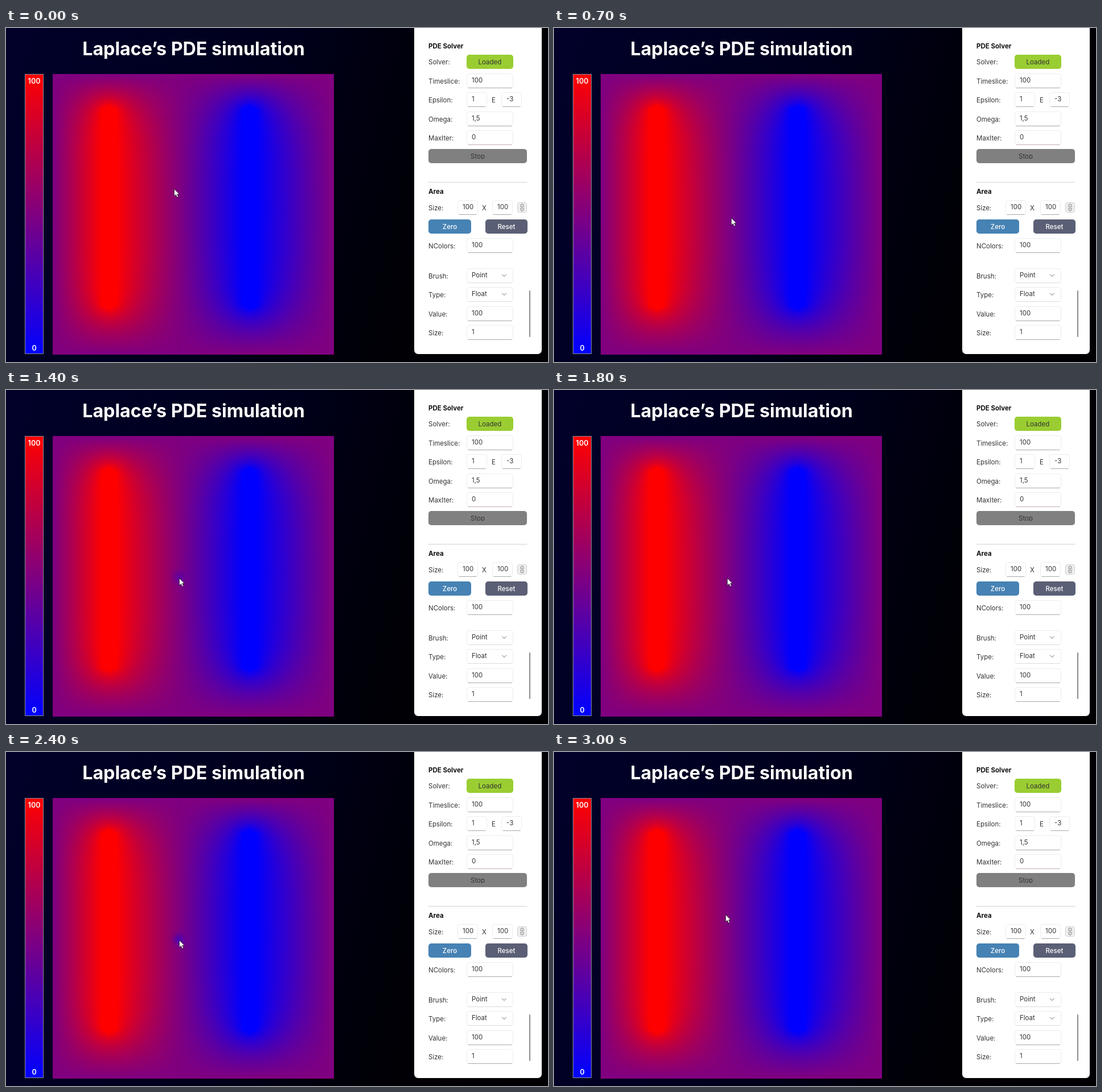
An HTML page with a canvas that plays this animation: 952x588 px, repeating every 3.1 s.

```html
<!DOCTYPE html>
<html lang="en">
<head>
<meta charset="utf-8">
<title>Laplace’s PDE simulation</title>
<style>
  html, body { margin: 0; width: 100%; height: 100%; overflow: hidden; }
  body { background: linear-gradient(105deg, #01012a, #00001c 45%, #000006 72%, #000003); }
  canvas, svg { position: absolute; left: 0; top: 0; }
  canvas { left: 82px; top: 81px; width: 494px; height: 494px; }
  text { font: 11.5px Inter, sans-serif; fill: #333; }
  .mid { text-anchor: middle; }
  .bold { font-weight: 700; fill: #111; }
  .light { fill: #fff; font-weight: 500; }
  .title { font-size: 32.2px; font-weight: 700; fill: #fff; }
  .scale { font-size: 12.5px; font-weight: 600; fill: #fff; }
</style>
</head>
<body>
<canvas id="field" width="100" height="100"></canvas>
<svg id="ui" width="952" height="588" viewBox="0 0 952 588"></svg>
<script>
const LOOP = 3100, STEP = 100, N = 100, CELL = 4.94;

// ---- interface ----
const text = (x, y, s, cls = '') => `<text x="${x}" y="${y}" class="${cls}">${s}</text>`;
const rect = (x, y, w, h, fill, r = 0, more = '') =>
  `<rect x="${x}" y="${y}" width="${w}" height="${h}" rx="${r}" fill="${fill}" ${more}/>`;
const line = (d, color, w = 1) =>
  `<path d="${d}" fill="none" stroke="${color}" stroke-width="${w}" stroke-linecap="round" stroke-linejoin="round"/>`;
const input = (x, y, w, value, under = '#a8a8a8') =>
  rect(x + .5, y + .5, w - 1, 25, '#fff', 4, 'stroke="#ececec"') +
  line(`M${x + 3} ${y + 25.5}h${w - 6}`, under) + text(x + 9, y + 16, value);
const row = (y, label, value, under) => text(742, y + 18, label) + input(809, y, 82, value, under);
const select = (y, label, value) =>
  row(y, label, value, '#dcdcdc') + line(`M871.5 ${y + 11}l3.5 3.5 3.5-3.5`, '#666');
const button = (x, y, w, label, fill, cls) =>
  rect(x, y, w, 25, fill, 5) + text(x + w / 2, y + 17, label, 'mid ' + cls);

document.getElementById('ui').innerHTML = `
  <linearGradient id="heat" x2="0" y2="1"><stop stop-color="#f00"/><stop offset="1" stop-color="#00f"/></linearGradient>` +
  text(329.5, 48, 'Laplace’s PDE simulation', 'title mid') +
  rect(33.5, 81.5, 32, 492, 'url(#heat)', 0, 'stroke="#8d8d92"') +
  text(49.5, 98, '100', 'scale mid') + text(49.5, 568, '0', 'scale mid') +
  rect(717, -12, 224, 586, '#fff', 7) +
  text(742, 36, 'PDE Solver', 'bold') + text(742, 64, 'Solver:') +
  button(809, 47, 82, 'Loaded', '#9acd32', '') +
  row(80, 'Timeslice:', '100') +
  text(742, 131, 'Epsilon:') + input(809, 113, 36, '1') + text(853, 131, 'E') + input(870, 113, 36, '-3') +
  row(147, 'Omega:', '1,5') + row(180, 'MaxIter:', '0', '#c4aab4') +
  button(742, 213, 173, 'Stop', '#808080', '') + rect(810, 230.5, 40, 5, '#808080') +
  line('M742 271.5H915', '#d2d2d2') +
  text(742, 292, 'Area', 'bold') + text(742, 321, 'Size:') +
  input(793, 303, 36, '100') + text(836, 321, 'X') + input(854, 303, 36, '100') +
  rect(898.5, 307.5, 16, 17, '#efefef', 3, 'stroke="#cfcfcf"') +
  line('M904 315v-2.5a2.5 2.5 0 0 1 5 0v2.500M904 317v2.500a2.500 2.500 0 0 0 5 0v-2.500M906.500 313.500v5', '#777') +
  button(742, 337, 75, 'Zero', '#4682b4', 'light') + button(842, 337, 74, 'Reset', '#5a5f75', 'light') +
  row(370, 'NColors:', '100') +
  select(423, 'Brush:', 'Point') + select(456, 'Type:', 'Float') +
  row(490, 'Value:', '100') + row(523, 'Size:', '1') +
  line('M920 463V543', '#8c8c8c', 2) +
  '<path id="cursor" d="M.5.5V13L3.400 10.300 5.500 15 7.700 14 5.700 9.500H9.300Z" fill="#fff" stroke="#222" stroke-width=".8"/>';

// ---- steady solution of Laplace's equation, edges held at 0.5 ----
const base = new Float64Array(N * N).fill(.5), free = [];
const inBar = (x, y, cx) => Math.hypot(x - cx, Math.max(0, 14 - y, y - 80)) < 3.25;
for (let y = 1; y < N - 1; y++) for (let x = 1; x < N - 1; x++) {
  const i = y * N + x;
  if (inBar(x, y, 19.5)) base[i] = 1;
  else if (inBar(x, y, 69.5)) base[i] = 0;
  else free.push(i);
}
for (let k = 0; k < 350; k++)
  for (const i of free)
    base[i] += 1.9 * ((base[i - 1] + base[i + 1] + base[i - N] + base[i + N]) / 4 - base[i]);

// ---- animation ----
const ctx = document.getElementById('field').getContext('2d');
const image = ctx.createImageData(N, N);
const cursor = document.getElementById('cursor');
const clicks = [1320, 2360];
const dotX = (303 - 82) / CELL - .5, dotY = (329.5 - 81) / CELL - .5;
// time, x, y of the pointer tip
const path = [[0, 295, 283], [200, 295, 283], [300, 295, 285], [700, 311, 334],
  [1000, 304, 331], [2500, 304, 331], [3000, 301, 286], [LOOP, 295, 283]];

function pointer(t) {
  const i = path.findIndex(p => p[0] > t), a = path[i - 1], b = path[i];
  let u = (t - a[0]) / (b[0] - a[0]);
  u = u * u * (3 - 2 * u);
  return [a[1] + (b[1] - a[1]) * u, a[2] + (b[2] - a[2]) * u];
}

// A clicked cell drops to blue and diffuses away.
function dip(x, y, t) {
  let sum = 0;
  for (const start of clicks) {
    const age = t - start;
    if (age < 0 || age > 600) continue;
    const spread = 1.1 + age / 90;
    sum += .42 / spread * Math.exp(-age / 160 - ((x - dotX) ** 2 + (y - dotY) ** 2) / (2 * spread));
  }
  return sum;
}

let shown = -1;
function draw() {
  const t = Math.floor(performance.now() % LOOP / STEP) * STEP;
  if (t !== shown) {
    shown = t;
    for (let i = 0; i < N * N; i++) {
      const v = Math.max(0, base[i] - dip(i % N, Math.floor(i / N), t));
      image.data.set([255 * v, 0, 255 * (1 - v), 255], i * 4);
    }
    ctx.putImageData(image, 0, 0);
    cursor.setAttribute('transform', `translate(${pointer(t)})`);
  }
  requestAnimationFrame(draw);
}
draw();
</script>
</body>
</html>
```
